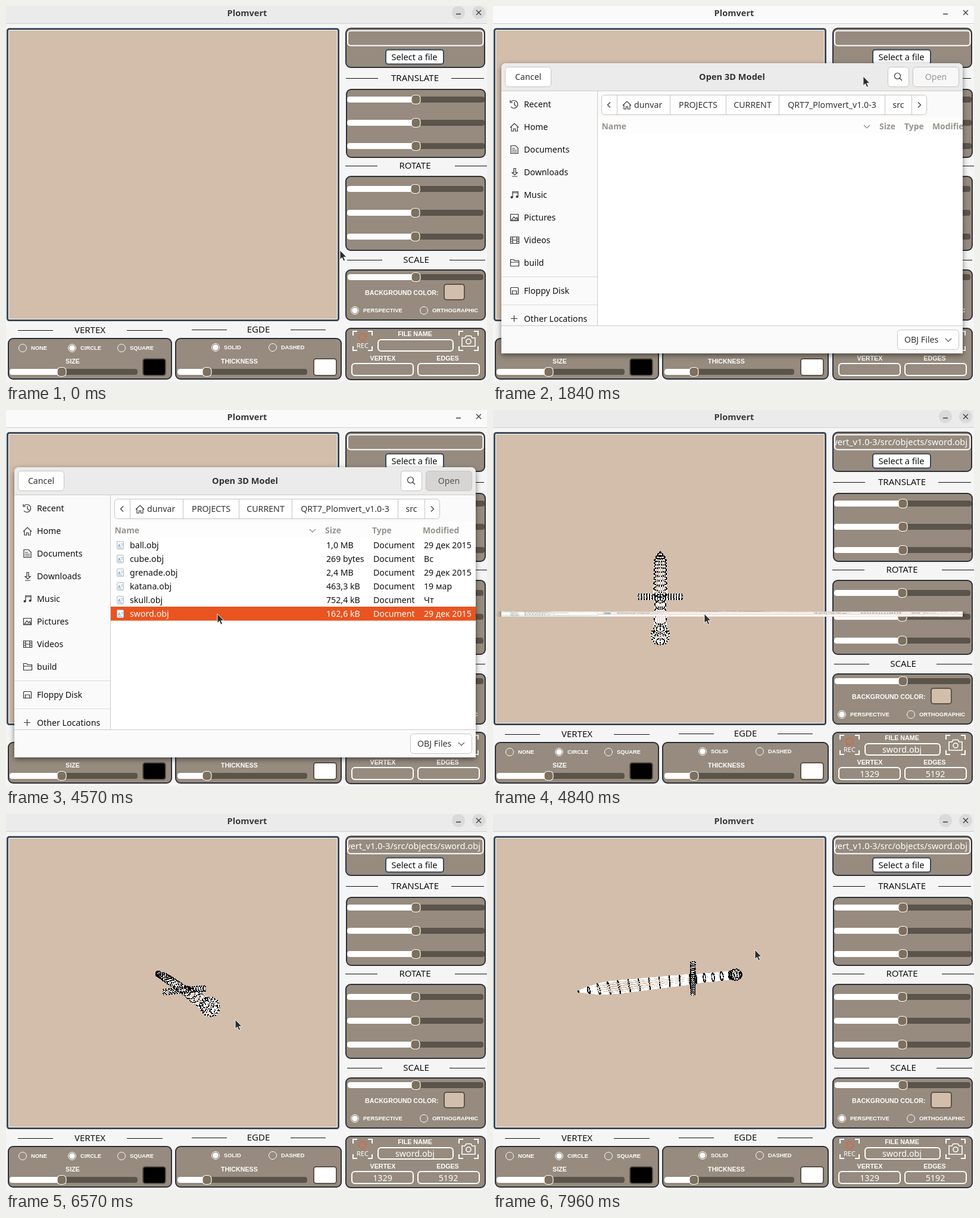
Write an HTML page that moves like this. It is 808 px wide and 631 px high and loops after 8000 ms.

```html
<!DOCTYPE html>
<html lang="en">
<head>
<meta charset="utf-8">
<title>Plomvert</title>
<style>
html, body { margin: 0; width: 100%; height: 100%; overflow: hidden; background: #f5f5f5; }
svg { display: block; position: fixed; inset: 0; width: 100%; height: 100%; }
text { font-family: "Noto Sans", "Open Sans", sans-serif; font-size: 14.2px; white-space: pre; }
.cap { font: bold 10.7px "Liberation Sans", Arial, sans-serif; fill: #fff; }
.opt { font: bold 9.4px "Liberation Sans", Arial, sans-serif; fill: #fff; }
.bold { font-weight: 700; }
</style>
</head>
<body>
<svg id="stage" viewBox="0 0 808 631" preserveAspectRatio="none"></svg>
<script>
const LOOP = 8000;
const SKIN = '#d3beab', PANEL = '#968b7e', DARK = '#5b544a', FRAME = '#3b4a58', ORANGE = '#e95420';

// ---------- markup helpers ----------
const box = (x1, y1, x2, y2, fill, stroke = 'none', r = 0, w = 1) =>
  `<rect x="${x1}" y="${y1}" width="${x2 - x1}" height="${y2 - y1}" rx="${r}" fill="${fill}" stroke="${stroke}" stroke-width="${w}"/>`;
const text = (x, y, s, { anchor = 'start', fill = '#111', cls = '', size = 0 } = {}) =>
  `<text x="${x}" y="${y}" text-anchor="${anchor}" fill="${fill}" class="${cls}"${size ? ` style="font-size:${size}px"` : ''}>${s}</text>`;
const mid = (x, y, s, o = {}) => text(x, y, s, { anchor: 'middle', ...o });
const line = (d, stroke = '#333', w = 1.2) => `<path d="${d}" fill="none" stroke="${stroke}" stroke-width="${w}"/>`;
const disc = (x, y, r, fill, stroke = 'none', w = 1) =>
  `<circle cx="${x}" cy="${y}" r="${r}" fill="${fill}" stroke="${stroke}" stroke-width="${w}"/>`;

const panel = (x1, y1, x2, y2) => box(x1, y1, x2, y2, PANEL, '#2d3238', 8, 2);
const field = (x1, y1, x2, y2) => box(x1, y1, x2, y2, PANEL, '#fff', 5, 2);
const swatch = (x1, y1, x2, y2, fill) => box(x1, y1, x2, y2, fill, DARK, 4, 2);
const slider = (x1, x2, at, y) =>
  box(x1, y - 5, x2, y + 5, DARK, 'none', 4) + box(x1, y - 5, at, y + 5, '#fff', 'none', 4) +
  box(at - 7.5, y - 7.5, at + 7.5, y + 7.5, '#7d705d', '#fff', 5.5, 1.2);
const radio = (x, y, label, on) =>
  disc(x, y, 6.5, 'none', '#fff') + (on ? disc(x, y, 4.8, '#fff') : '') + text(x + 14, y + 3.4, label, { cls: 'opt', fill: '#fff' });
const heading = (x, y, label, l1, l2, r1, r2) =>
  line(`M${l1} ${y + .5}H${l2}M${r1} ${y + .5}H${r2}`, '#111', 1) + mid(x, y + 5, label, { size: 15 });
const corners = (x1, y1, x2, y2, n = 7) => line(
  `M${x1} ${y1 + n}V${y1}H${x1 + n}M${x2 - n} ${y1}H${x2}V${y1 + n}M${x2} ${y2 - n}V${y2}H${x2 - n}M${x1 + n} ${y2}H${x1}V${y2 - n}`, '#fff', 2);
const cap = (x, y, s) => mid(x, y, s, { cls: 'cap', fill: '#fff' });

// ---------- main window ----------
const mainWindow = () => `
<rect width="808" height="631" fill="#f5f5f5"/>
<rect id="bar" width="808" height="29" fill="#ebebeb"/>${line('M0 29.5H808', '#d2cfcc', 1)}
${mid(405, 17, 'Plomvert', { cls: 'bold', fill: '#3a3a3a', size: 14.6 })}
<g id="rounds">${disc(760, 11, 11, '#dadada') + disc(794, 11, 11, '#dadada')}</g>
${line('M756 13.5H764M790 7L798 15M798 7L790 15', '#3a3a3a', 1.3)}
${box(2.5, 38.5, 558.5, 527.5, SKIN, FRAME, 3, 3) + box(4.5, 40.5, 556.5, 525.5, 'none', '#fff', 1)}
<g id="sword" shape-rendering="crispEdges" fill="none">
  <path id="edges" stroke="#fff" stroke-width="1.3"/><path id="dots" stroke="#000" stroke-width="1.8"/>
</g>
${panel(571, 37.5, 804, 103) + field(574, 41.5, 801.5, 66.5)}
<rect id="pick" x="638" y="73.5" width="97" height="24" rx="4" stroke="${FRAME}" stroke-width="2"/>
${mid(686, 91, 'Select a file', { size: 14.6 })}
${heading(687, 121, 'TRANSLATE', 571, 625, 748, 803) + panel(572, 140, 805, 254)}
${[157, 196, 235].map(y => slider(573, 804, 688.5, y)).join('')}
${heading(687, 268, 'ROTATE', 570, 624, 754, 808) + panel(571, 286, 805, 410)}
${[307, 347, 387].map(y => slider(573, 802, 687.5, y)).join('')}
${heading(689, 426, 'SCALE', 573, 632, 745, 805) + panel(571, 443, 805, 527) + slider(574, 802, 688.5, 455)}
${text(603, 485, 'BACKGROUND COLOR:', { cls: 'cap', fill: '#fff' }) + swatch(736, 467, 770, 493, SKIN)}
${radio(586, 511, 'PERSPECTIVE', true) + radio(702, 511, 'ORTHOGRAPHIC')}
${heading(141, 544, 'VERTEX', 20, 79, 203, 263) + panel(4, 558, 278, 626)}
${radio(28, 574, 'NONE') + radio(111, 574, 'CIRCLE', true) + radio(194, 574, 'SQUARE')}
${cap(112, 600, 'SIZE') + slider(6, 221, 93.5, 614) + swatch(230, 592, 268, 620, '#000')}
${heading(424, 543, 'EGDE', 312, 371, 478, 537) + panel(285, 558, 563, 626)}
${radio(352, 573, 'SOLID', true) + radio(448, 573, 'DASHED')}
${cap(392, 600, 'THICKNESS') + slider(288, 506, 337.5, 614) + swatch(517, 592, 555, 620, '#fff')}
${panel(571, 541, 805, 627) + corners(583, 546, 615, 578) + disc(599, 556, 5.8, 'none', '#e2643f', 1.8)}
${mid(599, 574, 'REC', { fill: '#fff', size: 11 })}
${corners(761, 546, 793, 578) + line('M766 557H771L773 553.5H781L783 557H788V571H766Z', '#fff', 1.6) + disc(777, 563, 4, 'none', '#fff', 1.6)}
${cap(687, 554, 'FILE NAME') + field(625, 560, 751, 579)}
${cap(633, 595, 'VERTEX') + field(581, 600, 684, 620) + cap(742, 595, 'EDGES') + field(692, 600, 795, 620)}
<g id="info">
  <g clip-path="url(#pathClip)">${text(797, 59, 'Plomvert_v1.0-3/src/objects/sword.obj', { anchor: 'end', fill: '#fff', size: 14.5 })}</g>
  ${[[687, 574.5, 'sword.obj'], [632.5, 615.5, '1329'], [743, 615.5, '5192']].map(a => mid(...a, { fill: '#fff', size: 14.3 })).join('')}
</g>`;

// ---------- file dialog ----------
const EDGE = '#c9c4c0';
const button = (x1, x2, y, fill = '#fff') => box(x1 + .5, y + .5, x2 - .5, y + 33.5, fill, EDGE, 5);
const chevron = (x, y) => line(`M${x - 5} ${y - 2}l5 5l5 -5`, '#555');
const house = (x, y) => line(`M${x - 7} ${y + 1}L${x} ${y - 6}L${x + 7} ${y + 1}M${x - 5} ${y}V${y + 7}H${x - 1.5}V${y + 3}H${x + 1.5}V${y + 7}H${x + 5}V${y}`);

const places = [
  ['Recent', 165, 'M30 161a6.5 6.5 0 1 1 0 8M29 158v4h4M36 161v5l3 2'],
  ['Home', 203],
  ['Documents', 241, 'M30 234.500h8l4 4v9h-12zM32 239h5M32 242h8M32 245h8'],
  ['Downloads', 279, 'M35 272.500h3v7h3l-4.500 4l-4.500 -4h3zM32 286h9'],
  ['Music', 317, 'M33 321V311.500H42V320M33 313.500H42'],
  ['Pictures', 355, 'M29.500 349.500h13v11h-13zM31 359l4 -5l3 3l2 -2l2 4z'],
  ['Videos', 393, 'M29.500 387.500h14v11h-14zM33 387v12M40 387v12M33 393h7M30 391h3M30 395h3M40 391h3M40 395h3'],
  ['build', 431, 'M29.500 436.500v-11h5l2 2h7v9zM29.500 430h14'],
  ['Floppy Disk', 478, 'M30.500 472.500h11l1 1v10h-13v-10zM32.500 483v-5h7v5'],
  ['Other Locations', 525, 'M30 524.500h11M35.500 519v11']
];
const place = ([name, y, d]) => (d ? line(d) : house(36, y)) + text(52, y + 5, name) +
  (name === 'Music' ? disc(31.500, 321, 2, '#333') + disc(40.500, 320, 2, '#333') : '');

const dialog = () => `
<g id="dialog">
  <g filter="url(#shade)"><path d="M14 583V104a8 8 0 0 1 8 -8H781a8 8 0 0 1 8 8V583Z" fill="#fafafa"/></g>
  <path d="M14 142V104a8 8 0 0 1 8 -8H781a8 8 0 0 1 8 8V142Z" fill="#ebebeb"/>
  ${box(176, 143, 789, 190, '#fafafa') + box(176, 188, 789, 536, '#fff')}
  ${button(20, 98, 102) + mid(59, 124, 'Cancel', { fill: '#333' })}
  ${mid(401.500, 124, 'Open 3D Model', { cls: 'bold', fill: '#333', size: 14.6 })}
  ${button(663, 699, 102) + disc(679.500, 117.500, 5, 'none', '#333', 1.2) + line('M683 121L687 125')}
  <g id="open"></g>
  ${places.map(place).join('') + line('M14 454.500H175M14 501.500H175', '#dcdad8', 1)}
  ${box(182.500, 149.500, 728.500, 182.500, '#fff', EDGE, 5)}
  <rect id="here" x="659" y="150" width="44" height="32" fill="#d6d6d6"/>
  ${line('M208.500 150V182M297.500 150V182M391.500 150V182M480.500 150V182M658.500 150V182M703.500 150V182', EDGE, 1)}
  ${line('M197 161.500l-4.500 4.500l4.500 4.500M714 161.500l4.500 4.500l-4.500 4.500') + house(225, 166) + text(237, 171, 'dunvar', { fill: '#333' })}
  ${[[344.500, 'PROJECTS'], [436, 'CURRENT'], [569.500, 'QRT7_Plomvert_v1.0-3'], [681, 'src']].map(([x, s]) => mid(x, 171, s, { fill: '#333' })).join('')}
  <g id="list" clip-path="url(#listClip)"></g>
  ${box(14, 536, 789, 583, '#fafafa') + line('M14 142.500H789M14 536.500H789M175.500 143V536', '#cfcbc8', 1)}
  ${button(679, 783, 543) + text(691, 565, 'OBJ Files', { fill: '#333' }) + chevron(765, 560)}
</g>`;

const folders = 'build 01:26,controller Вс,libraries Пн,misc Пт,model Пн,objects Сб,tests Пт,view Пн'
  .split(',').map(s => s.split(' ')).map(([name, date]) => [name, '', '', date]);
const files = [
  ['ball.obj', '1,0 MB', '29 дек 2015'], ['cube.obj', '269 bytes', 'Вс'], ['grenade.obj', '2,4 MB', '29 дек 2015'],
  ['katana.obj', '463,3 kB', '19 мар'], ['skull.obj', '752,4 kB', 'Чт'], ['sword.obj', '162,6 kB', '29 дек 2015']
].map(([name, size, date]) => [name, size, 'Document', date]);

const folderIcon = y => box(184.500, y - 6.500, 199.500, y + 6.500, '#6b6866', '#4c4a48', 2) +
  line(`M185 ${y - 6.500}h6l2 2h6`, '#c2492a', 1.5);
const fileIcon = y => box(186.500, y - 6.500, 197.500, y + 6.500, '#f6f8fa', '#b5bcc3', 1.5) +
  text(188, y + 3, 'A', { fill: '#3d86bd', size: 7 }) + line(`M193.500 ${y - 2.500}h3M193.500 ${y}h3M188.500 ${y + 4.500}h7`, '#8db5d2', 1);

function listing(kind, chosen) {
  const [size, type, date] = { none: [649, 691, 738], dirs: [631, 673, 720], files: [536, 615, 700] }[kind];
  const head = [[182.500, 'Name'], [size, 'Size'], [type, 'Type'], [date, 'Modified']]
    .map(([x, s]) => text(x, 207, s, { cls: 'bold', fill: '#97948f', size: 13.9 })).join('') +
    line(`M${size - 26} 200l5 5l5 -5`, '#8b8884');
  const rows = { none: [], dirs: folders, files }[kind];
  return box(176, 189, 789, 214, '#fdfdfd') + head + rows.map((cells, i) => {
    const y = 227 + 23 * i + (kind === 'dirs' && i ? 1 : 0), on = i === chosen;
    const xs = [208, size + 2, type + 2, date + 2];
    return (on ? box(176, y - 12, 789, y + 11.500, ORANGE) : '') +
      (kind === 'dirs' ? folderIcon(y) : fileIcon(y)) +
      cells.map((s, k) => text(xs[k], y + 5, s, { fill: on ? '#fff' : '#111' })).join('');
  }).join('');
}

const openButton = look => {
  const [fill, ink] = { off: ['#f7f7f7', '#959a95'], on: ['#fff', '#333'], down: ['#d6d5d4', '#555'] }[look];
  return button(705, 783, 102, fill) + mid(744, 124, 'Open', { fill: ink });
};

const stage = document.getElementById('stage');
stage.innerHTML = `<defs>
  <clipPath id="pathClip"><rect x="575" y="43" width="225" height="23"/></clipPath>
  <clipPath id="listClip"><rect x="176" y="188" width="613" height="348"/></clipPath>
  <filter id="shade" x="-5%" y="-5%" width="110%" height="112%"><feDropShadow dx="0" dy="3" stdDeviation="5" flood-opacity=".5"/></filter>
</defs>` + mainWindow() + dialog() +
  '<path id="arrow" d="M0 0V15.500L3.500 12.300L6 18L8.700 16.900L6.200 11.400H11Z" fill="#2b2b2b" stroke="#fff" stroke-width=".9"/>';
const el = Object.fromEntries([...stage.querySelectorAll('[id]')].map(n => [n.id, n]));

// ---------- sword mesh: [along blade, along guard, across] ----------
const mesh = [], links = [];
function tube(rings, sides, at) {
  for (let i = 0; i < rings; i++) {
    const base = mesh.length;
    for (let j = 0; j < sides; j++) {
      const a = 2 * Math.PI * j / sides;
      mesh.push(at(i / (rings - 1), Math.cos(a), Math.sin(a)));
      links.push([base + j, base + (j + 1) % sides]);
      if (i) links.push([base + j, base + j - sides]);
    }
  }
}
tube(12, 18, (k, c, s) => {
  const w = 12.3 * Math.min(1, 4 * k + .05) ** .8 - 4.5 * Math.max(0, k - .35);
  return [138 - 188 * k, w * c, Math.min(4, w) * s];
});
tube(17, 8, (k, c, s) => {
  const u = 60 * k - 30;
  return [-55 + 4 * c, u, 4 * s];
});
tube(5, 20, (k, c, s) => [-60 - 58 * k, 7 * c, 7 * s]);
tube(8, 16, (k, c, s) => {
  const r = 9.5 * Math.sin(Math.PI * k);
  return [-127 + 9.5 * Math.cos(Math.PI * k), r * c, r * s];
});

const poses = [
  { blade: [0, .455, -.89], guard: [1, 0, 0] },
  { blade: [-.284, .188, -.94], guard: [.96, .07, -.276] },
  { blade: [-.994, -.105, 0], guard: [.1, -.86, -.5] }
];
const dot = (a, b) => a[0] * b[0] + a[1] * b[1] + a[2] * b[2];
const unit = a => a.map(v => v / Math.sqrt(dot(a, a)));
const mix = (a, b, k) => a.map((v, i) => v + (b[i] - v) * k);
const cross = (a, b) => [a[1] * b[2] - a[2] * b[1], a[2] * b[0] - a[0] * b[2], a[0] * b[1] - a[1] * b[0]];

function drawSword(turn) {
  const i = Math.min(1, Math.floor(turn)), k = turn - i;
  const a = unit(mix(poses[i].blade, poses[i + 1].blade, k));
  const raw = mix(poses[i].guard, poses[i + 1].guard, k), lean = dot(raw, a);
  const g = unit(raw.map((v, n) => v - lean * a[n])), n = cross(a, g);
  const flat = mesh.map(([s, u, v]) => {
    const [x, y, z] = [0, 1, 2].map(m => a[m] * s + g[m] * u + n[m] * v);
    const f = 290 / (290 - z);
    return [(281 + x * f).toFixed(1), (283 - y * f).toFixed(1)];
  });
  el.edges.setAttribute('d', links.map(([p, q]) => `M${flat[p]}L${flat[q]}`).join(''));
  el.dots.setAttribute('d', flat.map(([x, y]) => `M${x - .9} ${y}h1.8`).join(''));
}

// ---------- timeline ----------
function track(keys, t) {
  let i = 1;
  while (i < keys.length - 1 && t > keys[i][0]) i++;
  const [t0, ...a] = keys[i - 1], [t1, ...b] = keys[i];
  return mix(a, b, Math.min(1, Math.max(0, (t - t0) / (t1 - t0))));
}
const pointer = [
  [0, 561, 410], [40, 562, 406], [420, 597, 280], [790, 617, 173], [1120, 632, 115], [1440, 648, 88],
  [1710, 648, 88], [1840, 622, 118], [2500, 540, 180], [3000, 404, 296], [3240, 376, 320], [3570, 357, 335],
  [4030, 357, 335], [4230, 355, 342], [5560, 355, 342], [5820, 360, 361], [6090, 360, 361], [6570, 385, 345],
  [6910, 411, 334], [7400, 440, 290], [7735, 446, 256], [7960, 440, 228]
];
const spin = [[6090, 0], [6570, 1], [6840, 1.32], [7300, 1.72], [7700, 1.97], [7960, 2]];

function dialogScale(t) {
  if (t < 1710 || t >= 4900) return 0;
  if (t < 1840) return 1 - (1 - (t - 1690) / 150) ** 2;
  if (t < 4760) return 1;
  return Math.max(.0186, .55 * (1 - (t - 4760) / 82.8));
}

const last = {};
function fill(id, key, make) {
  if (last[id] === key) return;
  last[id] = key;
  el[id].innerHTML = make();
}
const show = (id, on) => el[id].setAttribute('display', on ? 'inline' : 'none');

function render(t) {
  const active = t < 1710 || t >= 4760, loaded = t >= 4800;
  el.bar.setAttribute('fill', active ? '#ebebeb' : '#fafafa');
  show('rounds', active);
  show('info', loaded);
  show('sword', loaded);
  if (loaded) drawSword(track(spin, t)[0]);
  el.pick.setAttribute('fill', t > 1270 && t < 1710 ? '#e6e6e6' : '#fff');

  const scale = dialogScale(t);
  show('dialog', scale > 0);
  if (scale > 0) {
    el.dialog.setAttribute('transform', `translate(0 ${342.5 - 3 * scale}) scale(1 ${scale}) translate(0 -339.5)`);
    const kind = t < 2620 ? 'none' : t < 3770 ? 'dirs' : t < 3830 ? 'none' : 'files';
    const chosen = kind === 'dirs' ? (t < 3500 ? 0 : 5) : (t < 4160 ? 0 : 5);
    fill('list', kind + chosen, () => listing(kind, chosen));
    const look = t < 2620 ? 'off' : t < 4500 ? 'on' : 'down';
    fill('open', look, () => openButton(look));
  }
  show('here', scale > 0 && t >= 2620 && t < 3770);
  el.arrow.setAttribute('transform', `translate(${track(pointer, t).map(v => v.toFixed(1))})`);
}

const start = performance.now();
function tick() {
  render((performance.now() - start) % LOOP);
  requestAnimationFrame(tick);
}
tick();
</script>
</body>
</html>
```
